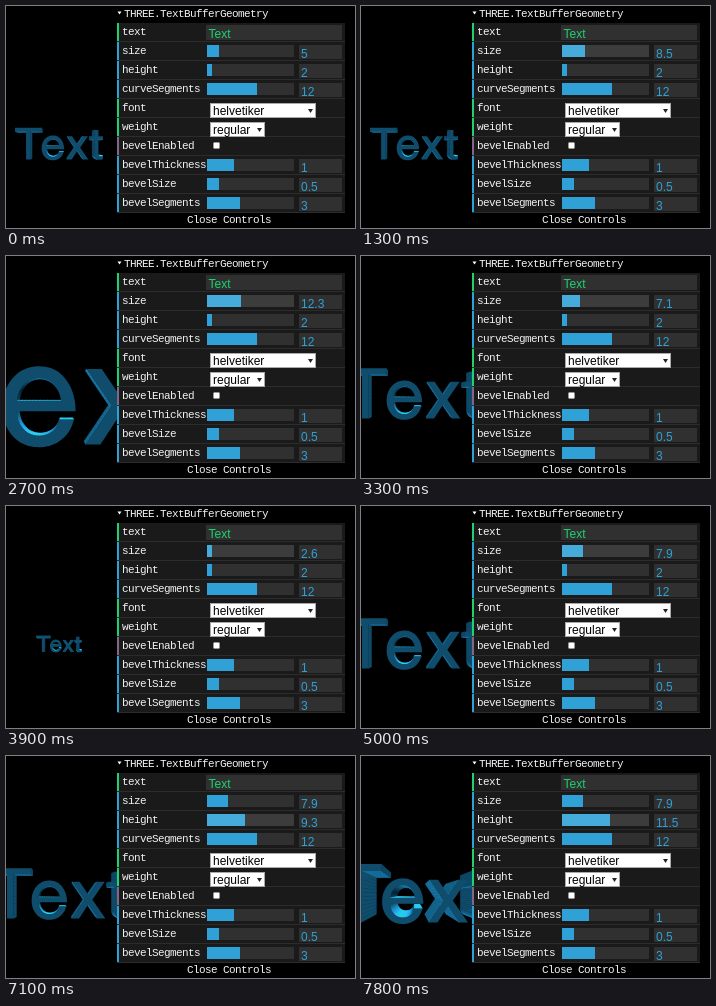
Recreate the animation shown at these times as an HTML page with a canvas. Size 349 by 222 pixels, loop 8 s.

```html
<!DOCTYPE html>
<html lang="en">
<head>
<meta charset="utf-8">
<title>Text geometry controls</title>
<style>
  html, body { margin: 0; width: 100%; height: 100%; overflow: hidden; background: #000; }
  canvas, svg { position: absolute; left: 0; top: 0; width: 349px; height: 222px; }
  .mono { font: 11px "Liberation Mono", monospace; letter-spacing: -.6px; fill: #f2f2f2; }
  .sans { font: 12px "Liberation Sans", Arial, sans-serif; }
</style>
</head>
<body>
<canvas id="scene" width="349" height="222"></canvas>
<svg id="panel" viewBox="0 0 349 222"></svg>
<script>
const LOOP = 8000, STEP = 100;
const BLUE = '#2fa1d6', GREEN = '#1ed36f', PURPLE = '#806787';
const BAR_HOVER = '#44abda', FIELD = '#303030', FIELD_HOVER = '#3c3c3c';
const TRACK = { x: 201, w: 87 };

// ---- control panel ----
const rect = (x, y, w, h, fill, extra = '') =>
  `<rect x="${x}" y="${y}" width="${w}" height="${h}" fill="${fill}" ${extra}/>`;
const text = (x, y, cls, str, extra = '') =>
  `<text x="${x}" y="${y}" class="${cls}" ${extra}>${str}</text>`;
const fillWidth = (v, min, max) => Math.round((v - min) / (max - min) * TRACK.w);

const slider = (value, min, max) => (y, name) =>
  rect(TRACK.x, y + 3, TRACK.w, 12, FIELD, `id="${name}-track"`) +
  rect(TRACK.x, y + 3, fillWidth(value, min, max), 12, BLUE, `id="${name}-bar"`) +
  rect(293, y + 3, 43, 14, FIELD) +
  text(295, y + 16, 'sans', value, `fill="${BLUE}" id="${name}-value"`);

const select = (value, w) => y => {
  const ax = 204 + w - 8;
  return rect(204.5, y + 4.5, w - 1, 14, '#fff', 'stroke="#a9a9a9"') +
    text(207, y + 15.5, 'sans', value, 'fill="#000"') +
    `<path d="M${ax} ${y + 10}h5l-2.5 4z" fill="#222"/>`;
};

const input = value => y =>
  rect(200, y + 2, 136, 15, FIELD) + text(202.5, y + 15, 'sans', value, `fill="${GREEN}"`);

const checkbox = y => rect(207.5, y + 5.5, 6, 6, '#fff', 'stroke="#999" rx="1"');

const rows = [
  ['text', GREEN, input('Text')],
  ['size', BLUE, slider(5, 1, 30)],
  ['height', BLUE, slider(2, 1, 20)],
  ['curveSegments', BLUE, slider(12, 1, 20)],
  ['font', GREEN, select('helvetiker', 106)],
  ['weight', GREEN, select('regular', 55)],
  ['bevelEnabled', PURPLE, checkbox],
  ['bevelThickness', BLUE, slider(1, .1, 3)],
  ['bevelSize', BLUE, slider(.5, .1, 3)],
  ['bevelSegments', BLUE, slider(3, 0, 8)]
];

const $ = id => document.getElementById(id);
$('panel').innerHTML =
  rect(111, 0, 228, 222, '#000') +
  '<path d="M111.5 5.5h4l-2 3z" fill="#fff"/>' +
  text(118, 11, 'mono', 'THREE.TextBufferGeometry') +
  rows.map(([name, color, control], i) => {
    const y = 17 + 19 * i;
    return rect(111, y, 228, 18, '#1a1a1a') + rect(111, y + 18, 228, 1, '#2c2c2c') +
      rect(111, y, 2, 18, color) + text(116, y + 12, 'mono', name) + control(y, name);
  }).join('') +
  text(181, 217, 'mono', 'Close Controls');

// ---- letter outlines: [offset, path], 1000 units per size ----
const GLYPHS = [
  [0, 'M835 894 L484 894 L484 0 L352 0 L352 894 L0 894 L0 1013 L835 1013 L835 894'],
  [849, 'M714 326 L140 326 Q140 227 200 157 Q260 87 359 87 Q431 87 488 130 Q545 174 561 245 ' +
    'L697 245 Q670 123 577 48 Q484 -26 358 -26 Q195 -26 97 85 Q0 197 0 363 Q0 529 94 642 ' +
    'Q195 765 358 765 Q529 765 626 627 Q714 503 714 326'],
  [849, 'M576 429 Q564 522 507 583 Q445 650 355 650 Q266 650 206 583 Q152 522 140 429 L576 429'],
  [1662, 'M675 0 L525 0 L331 286 L144 0 L0 0 L256 379 L12 739 L157 739 L336 473 L516 739 ' +
    'L661 739 L412 380 L675 0'],
  [2426, 'M377 8 Q316 -9 268 -9 Q107 -9 107 150 L107 640 L0 640 L0 739 L107 739 L107 944 ' +
    'L232 944 L232 739 L377 739 L377 640 L232 640 L232 175 Q232 105 310 105 Q340 105 377 112 L377 8']
];
const CENTER = { x: 1401, y: 494 };
const SEGMENTS = 12;

// Lines are split like curves, so that walls can be sorted by distance
function flatten([dx, path]) {
  const pts = [];
  for (const [, cmd, args] of path.matchAll(/([MLQ])([^MLQ]+)/g)) {
    const n = args.trim().split(' ').map(Number);
    if (cmd === 'M') { pts.push(n); continue; }
    const [x0, y0] = pts[pts.length - 1], [x1, y1] = n.slice(-2);
    const [cx, cy] = cmd === 'Q' ? n : [(x0 + x1) / 2, (y0 + y1) / 2];
    for (let i = 1; i <= SEGMENTS; i++) {
      const t = i / SEGMENTS, a = (1 - t) ** 2, b = 2 * t * (1 - t), c = t * t;
      pts.push([a * x0 + b * cx + c * x1, a * y0 + b * cy + c * y1]);
    }
  }
  return pts.map(([x, y]) => [x + dx - CENTER.x, y - CENTER.y]);
}

// Two lights above, one below
function shade(nx, ny, nz) {
  const light = Math.max(0, ny) + Math.abs(.408 * nx + .816 * ny + .408 * nz);
  const mix = (base, glow) => Math.min(255, Math.round(glow + base * light));
  return `rgb(${mix(21, 7)},${mix(98, 37)},${mix(137, 52)})`;
}

const contours = GLYPHS.map(flatten);
const walls = [];
for (const pts of contours) {
  for (let i = 1; i < pts.length; i++) {
    const a = pts[i - 1], b = pts[i];
    const len = Math.hypot(b[0] - a[0], b[1] - a[1]);
    const nx = (a[1] - b[1]) / len, ny = (b[0] - a[0]) / len;
    // Only walls turned to the view axis can be seen
    if (nx * a[0] + ny * a[1] >= 0) continue;
    walls.push({ a, b, color: shade(nx, ny, 0), r: Math.hypot(a[0] + b[0], a[1] + b[1]) });
  }
}
walls.sort((p, q) => q.r - p.r);
const FACE = shade(0, 0, 1);

const ctx = $('scene').getContext('2d');

function trace(pts) {
  pts.forEach(([x, y], i) => i ? ctx.lineTo(x, y) : ctx.moveTo(x, y));
  ctx.closePath();
}

function drawText(size, depth) {
  const project = z => {
    const k = .182 * size / (30 - z);
    return ([x, y]) => [53 + x * k, 138 - y * k];
  };
  const front = project(depth / 2), back = project(-depth / 2);
  ctx.clearRect(0, 0, 349, 222);
  ctx.lineWidth = .4;
  for (const { a, b, color } of walls) {
    ctx.beginPath();
    trace([front(a), front(b), back(b), back(a)]);
    ctx.fillStyle = ctx.strokeStyle = color;
    ctx.fill();
    ctx.stroke();
  }
  ctx.beginPath();
  contours.forEach(pts => trace(pts.map(front)));
  ctx.fillStyle = FACE;
  ctx.fill();
}

// ---- timing: [ms, value] ----
const sizeDrag = [[0, 5], [1000, 5], [1100, 4.2], [1300, 8.5], [1700, 15.6], [1900, 15.6],
  [2000, 16.3], [2200, 16.3], [2300, 15.7], [2700, 12.3], [2900, 9.4], [3000, 9.4],
  [3900, 2.6], [4200, 5.6], [4300, 5.6], [4400, 7.1], [4500, 7.9]];
const heightDrag = [[0, 2], [6400, 2], [6500, 2.9], [7100, 9.3], [7200, 9.3], [7300, 10.2],
  [7600, 11.3], [7700, 11.3], [7800, 11.5]];
// The mesh is rebuilt less often than the sliders move
const meshSize = [[0, 5], [2000, 16.3], [2800, 12.3], [3300, 7.9], [3600, 5.6], [3900, 2.6],
  [4400, 7.1], [5000, 7.9]];
const meshDepth = [[0, 2], [7300, 10.2]];

const lastKey = (keys, t) => keys.findLastIndex(k => k[0] <= t);
const hold = (keys, t) => keys[lastKey(keys, t)][1];
function drag(keys, t) {
  const i = lastKey(keys, t), [t0, v0] = keys[i], [t1, v1] = keys[i + 1] || [t0 + 1, v0];
  return v0 + (v1 - v0) * (t - t0) / (t1 - t0);
}

function setSlider(name, value, max, hovered) {
  const v = +value.toFixed(1), bar = $(name + '-bar');
  bar.setAttribute('width', fillWidth(v, 1, max));
  bar.setAttribute('fill', hovered ? BAR_HOVER : BLUE);
  $(name + '-track').setAttribute('fill', hovered ? FIELD_HOVER : FIELD);
  $(name + '-value').textContent = v;
}

const start = performance.now();
let shown = -1;
function tick() {
  const t = Math.floor((performance.now() - start) % LOOP / STEP) * STEP;
  if (t !== shown) {
    shown = t;
    setSlider('size', drag(sizeDrag, t), 30, t >= 400 && t < 5700);
    setSlider('height', drag(heightDrag, t), 20, t >= 5700);
    drawText(hold(meshSize, t), hold(meshDepth, t));
  }
  requestAnimationFrame(tick);
}
tick();
</script>
</body>
</html>
```
